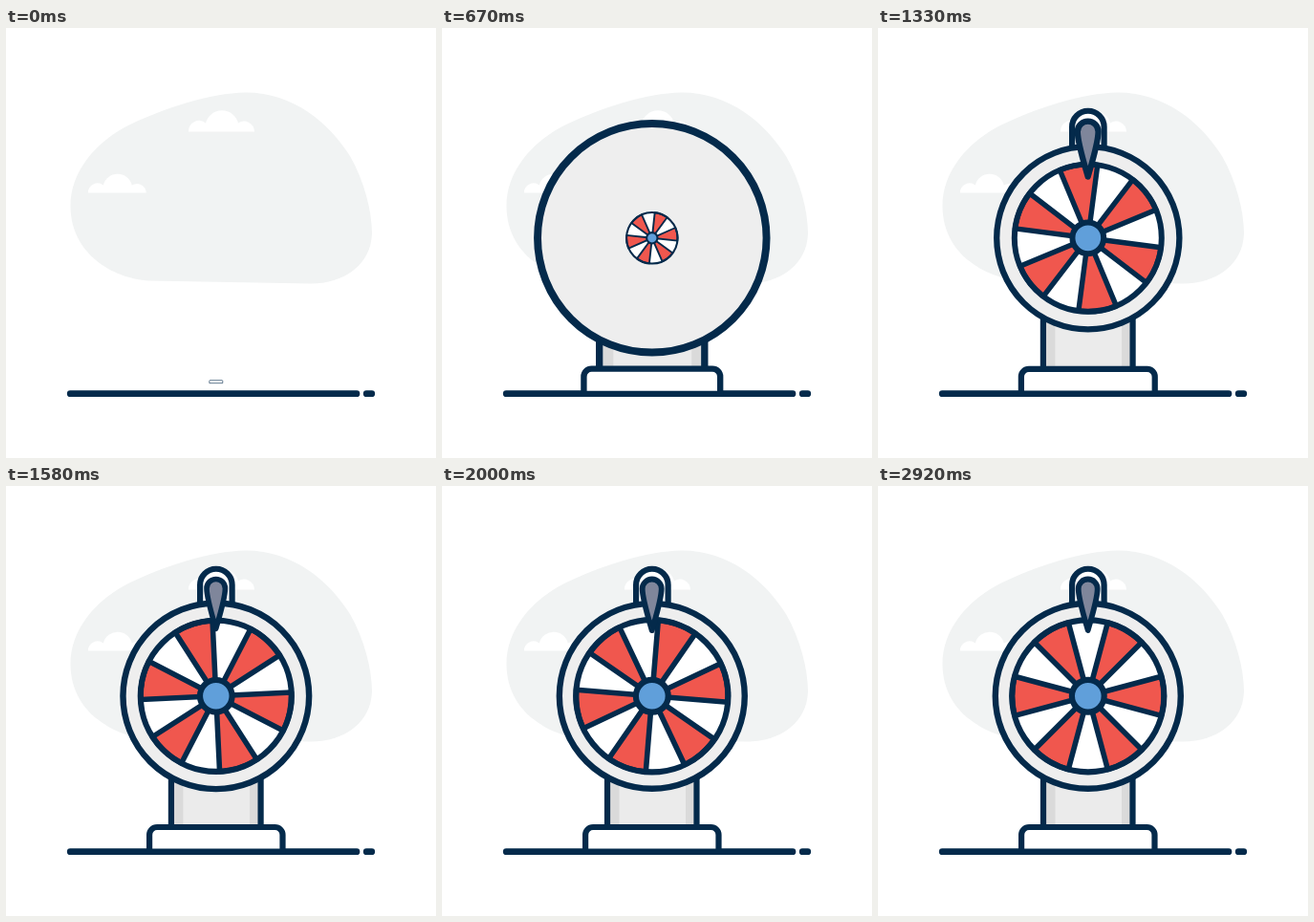
Recreate the animation shown at these times as an HTML page. Size 450x450 px, loop 3000 ms.

```html
<!DOCTYPE html>
<html lang="en">
<head>
<meta charset="utf-8">
<title>Prize wheel</title>
<style>
  html, body { margin: 0; width: 100%; height: 100%; overflow: hidden; background: #fff; }
  svg { display: block; width: 100vw; height: 100vh; }
  .line { stroke: #042a4b; stroke-width: 6.2; stroke-linecap: round; stroke-linejoin: round; }
</style>
</head>
<body>
<svg viewBox="0 0 450 450">
  <path fill="#f1f3f3" d="M250 67.5C300 67 338 99 360 134C375 160 383 192 383 215C382 249 352 268 318 267.5L150 264.5C110 262 68 235 67.5 187C67 150 95 118 130 101C165 84 215 68 250 67.5Z"/>
  <defs>
    <path id="cloud" d="M0 0A11 11 0 0 1 18-9A17.5 17.5 0 0 1 52-9A11 11 0 0 1 69 0Z" fill="#fff"/>
  </defs>
  <use href="#cloud" transform="translate(191 108.5)"/>
  <use href="#cloud" transform="translate(86 172.5) scale(.88)"/>

  <path id="holder" class="line" fill="#fff" d="M203.1 140V103.5a16.75 16.75 0 0 1 33.5 0V140"/>

  <g id="pillar">
    <path fill="#ebebeb" d="M173 296h93.5v64H173z"/>
    <path fill="#dadada" d="M175 296h10.5v64H175zM255 296h10v64h-10z"/>
    <path class="line" fill="none" d="M173 296h93.5v64H173z"/>
  </g>

  <path class="line" style="stroke-width:6.7" d="M67.2 382.7H367M377.2 382.7H382.8"/>
  <path id="base" class="line" fill="#fff" d="M150.1 382.6V365a8 8 0 0 1 8-8H281.5a8 8 0 0 1 8 8V382.6Z"/>

  <g id="ring"><circle class="line" cx="219.8" cy="219.8" r="97" fill="#eee" style="stroke-width:6.4"/></g>

  <g id="wheel">
    <g id="spin">
      <circle cx="219.8" cy="219.8" r="79.5" fill="#fff"/>
      <g id="sectors" class="line" style="stroke-width:5.6"></g>
    </g>
    <circle class="line" cx="219.8" cy="219.8" r="79.5" fill="none"/>
    <circle class="line" cx="219.8" cy="219.8" r="16.9" fill="#609fda"/>
  </g>

  <path id="pointer" class="line" style="stroke-width:5.8" fill="#7f869b" d="M219.7 151C216 138 209.7 118 209.7 107.5a10 10 0 0 1 20 0C229.7 118 223.4 138 219.7 151Z"/>
</svg>
<script>
  const LOOP = 3000, STEP = LOOP / 36, C = 219.8, R = 79.5;
  const el = id => document.getElementById(id);

  // Six red sectors alternate with white gaps; sector 0 points straight up.
  const rim = deg => {
    const a = deg * Math.PI / 180;
    return `${C + R * Math.sin(a)} ${C - R * Math.cos(a)}`;
  };
  el('sectors').innerHTML = Array.from({ length: 6 }, (_, i) =>
    `<path fill="#f0574e" d="M${C} ${C}L${rim(i * 60 - 15)}A${R} ${R} 0 0 1 ${rim(i * 60 + 15)}Z"/>`).join('');

  // Grow from 10 %, then ring around full size like a damped spring.
  const RISE = 262;
  function pop(t) {
    if (t < RISE) return 0.1 + 0.9 * (t / RISE) ** 2.6;
    const s = (t - RISE) / 1000;
    return 1 + 0.66 * Math.sin(7.1 * s) * Math.exp(-4.9 * s);
  }

  const parts = [
    { id: 'base', y: 370, delay: 0, pace: 1 },
    { id: 'pillar', y: 330, delay: 145, pace: 1 },
    { id: 'ring', y: C, delay: 328, pace: 1 },
    { id: 'wheel', y: C, delay: 510, pace: 1 },
    { id: 'pointer', y: 97, delay: 672, pace: 1.1 }
  ];

  const clamp = x => Math.min(1, Math.max(0, x));

  function draw(t) {
    for (const { id, y, delay, pace } of parts) {
      const age = (t - delay) / pace, node = el(id);
      node.style.visibility = age < 0 ? 'hidden' : 'visible';
      if (age >= 0) {
        const k = pop(age);
        node.setAttribute('transform', `translate(${C} ${y}) scale(${k}) translate(${-C} ${-y})`);
      }
    }
    const left = (1 - clamp((t - 375) / 2625)) ** 4.4;
    el('spin').setAttribute('transform', `rotate(${30 - 720 * left} ${C} ${C})`);

    const rise = (1 - clamp((t - 660) / 320)) ** 3;
    el('holder').style.visibility = t < 660 ? 'hidden' : 'visible';
    el('holder').setAttribute('transform', `translate(0 ${40 * rise})`);
  }

  const start = performance.now();
  function tick() {
    const t = (performance.now() - start) % LOOP;
    draw(Math.floor((t + 4) / STEP) * STEP % LOOP);
    requestAnimationFrame(tick);
  }
  tick();
</script>
</body>
</html>
```
